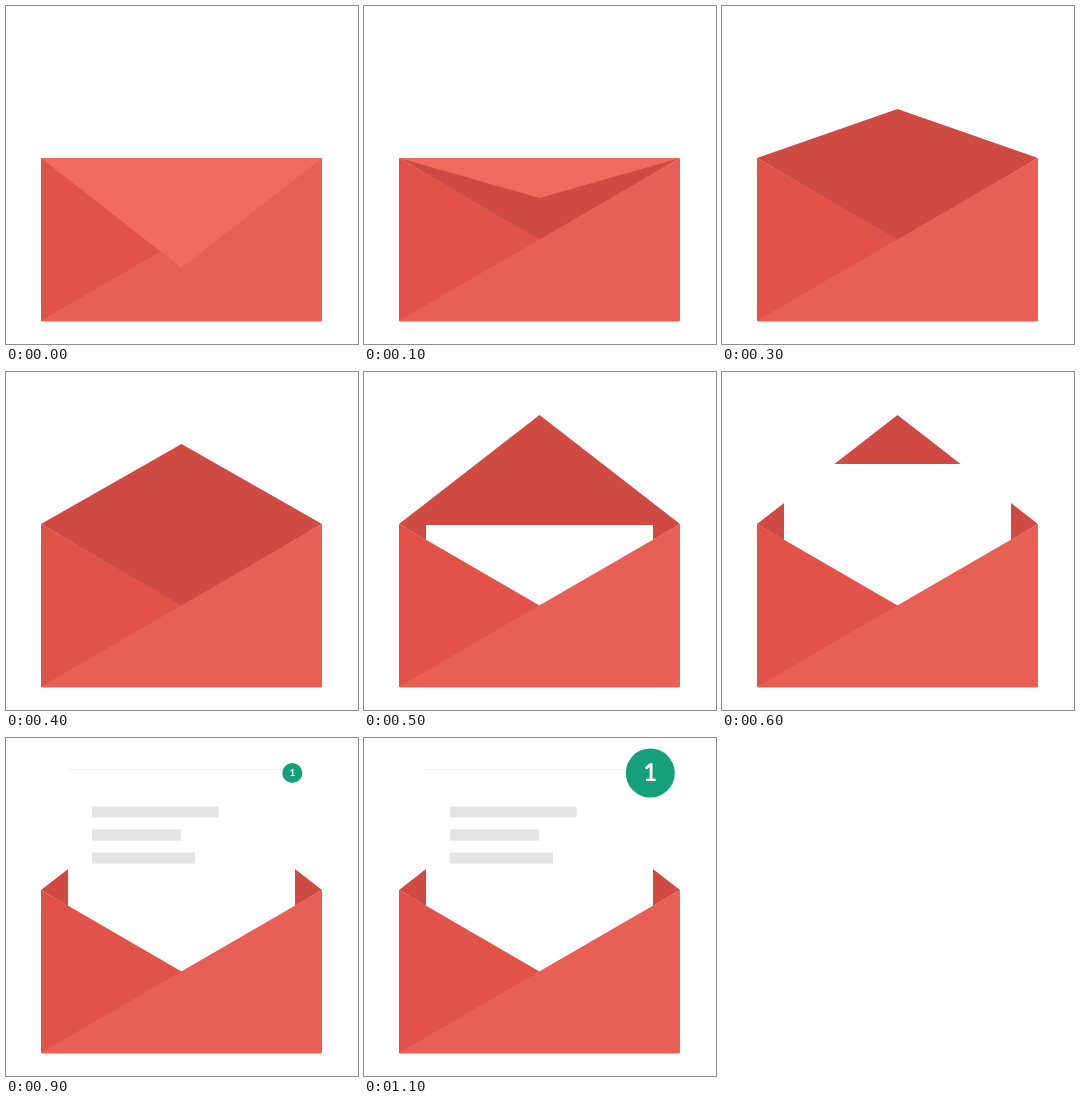
An HTML page that plays this animation: 352x338 px, repeating every 3.1 s.

```html
<!DOCTYPE html>
<html lang="en">
<head>
<meta charset="utf-8">
<title>New message</title>
<style>
  html, body { margin: 0; width: 100%; height: 100%; overflow: hidden; background: #fff; }
  svg { display: block; width: 100%; height: 100%; }
  text { font: 700 24px Lato, sans-serif; fill: #fff; text-anchor: middle; }
</style>
</head>
<body>
<svg viewBox="0 0 352 338">
  <path id="inside" fill="#cf4a42"/>
  <g id="paper">
    <rect x="62" width="227" height="210" fill="#fefefe"/>
    <rect id="edge" x="62" width="227" height="1" fill="#f1f1f1"/>
    <g id="lines" fill="#e4e4e4">
      <rect x="86" y="37.5" width="126.5" height="11"/>
      <rect x="86" y="60.5" width="89" height="11"/>
      <rect x="86" y="83.5" width="103" height="11"/>
    </g>
  </g>
  <path fill="#e15349" d="M35 152L175.5 233.5L176 315H35Z"/>
  <path fill="#e86055" d="M316 152V314.5L315 315.5H36L35 314.7Z"/>
  <path id="flap" fill="#f26a5e"/>
  <g id="badge">
    <circle r="24.5" fill="#16a07a"/>
    <text y="7.5">1</text>
  </g>
</svg>
<script>
  const LOOP = 3100, STEP = 100, LAST_STEP = 11;
  const HINGE = 152;
  const flapTips = [262, 192, 147, 103, 72, 43];
  const $ = id => document.getElementById(id);
  const show = (id, visible) => $(id).setAttribute("visibility", visible ? "inherit" : "hidden");
  const clamp01 = v => Math.max(0, Math.min(1, v));

  function draw(now) {
    const step = Math.min(LAST_STEP, Math.floor(now % LOOP / STEP));

    // The flap swings from the front of the envelope to behind it.
    const tip = flapTips[Math.min(step, 5)];
    const backTip = Math.min(tip, HINGE);
    $("inside").setAttribute("d", `M35 ${HINGE}L175.5 ${backTip}L316 ${HINGE}L175.5 235Z`);
    $("flap").setAttribute("d", `M35 ${HINGE}H316L175.5 ${tip}Z`);
    show("flap", tip > HINGE);

    // The letter slides up out of the envelope.
    const paperY = 153 - 122 * clamp01((step - 5) / 2);
    $("paper").setAttribute("transform", `translate(0 ${paperY})`);
    show("paper", step >= 5);
    show("edge", step >= 7);
    show("lines", step >= 7);

    // The badge grows on the corner of the letter.
    const size = clamp01(1 - (LAST_STEP - step) * 0.295);
    $("badge").setAttribute("transform", `translate(286.3 35) scale(${size})`);
    show("badge", step >= 8);

    requestAnimationFrame(tick);
  }

  const start = performance.now();
  function tick() { draw(performance.now() - start); }
  tick();
</script>
</body>
</html>
```
